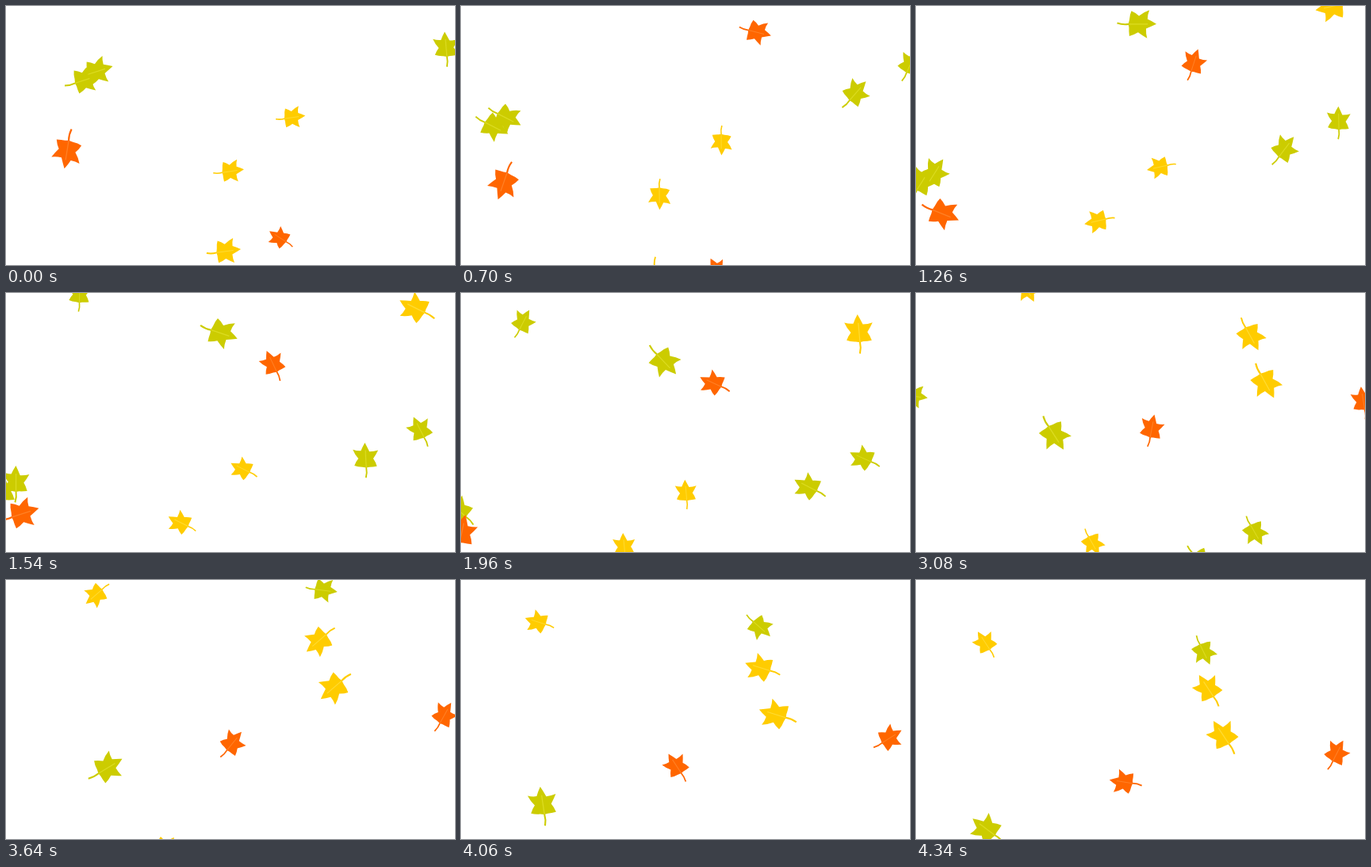
An HTML page with a canvas that plays this animation: 566 px wide and 327 px high, repeating every 4480 ms.

```html
<!DOCTYPE html>
<html lang="en">
<head>
<meta charset="utf-8">
<title>Falling leaves</title>
<style>
  html, body { margin: 0; width: 100%; height: 100%; overflow: hidden; background: #fff; }
  canvas { display: block; }
</style>
</head>
<body>
<canvas id="stage" width="566" height="327"></canvas>
<script>
const ctx = document.getElementById('stage').getContext('2d');
const STEP = 140, STEPS = 32;

// Steps at which the shared wind paths have a bend
const bends = [0, 5, 9, 14, 18, 26, 31];

const yellow = {
  fill: '#fc0', vein: '#ffdb33',
  x: [0, -32, -52, -76, -110, -164, -190],
  y: [0, 30, 62, 112, 154, 197, 259]
};
const green = {
  fill: '#cc0', vein: '#dcdc22',
  x: [0, -58, -91, -116, -150, -244, -281],
  y: [0, 58, 129, 192, 229, 344, 421]
};
const red = {
  fill: '#f60', vein: '#ff8126',
  x: [0, -23, -45, -76, -87, -110, -132],
  y: [0, 40, 80, 121, 147, 214, 262]
};

// turns: [step, stem angle in degrees] pairs
const spin = [[0, 175], [31, 779.5]];
const rock = [[0, 165], [5, 210], [9, 125], [14, 45]];

const leaf = (kind, x, y, size, turns, born = 0) => ({ kind, x, y, size, turns, born });
const leaves = [
  leaf(yellow, 360, 141, 18.5, spin),
  leaf(yellow, 282, 209, 19.3, spin),
  leaf(yellow, 276, 310, 21.5, spin),
  leaf(yellow, 578, -62, 24.5, spin),
  leaf(yellow, 559, -121, 23, spin, 15),
  leaf(yellow, 278, -179, 19, spin),
  leaf(green, 98, 94, 23, rock),
  leaf(green, 114, 83, 23, rock),
  leaf(green, 555, 53, 22, [[0, 88], [7.6, 158], [18, -50]]),
  leaf(green, 624, 17, 20.5, [[0, 150], [9, 92], [14, 27], [18, -45]]),
  leaf(green, 371, -106, 24.5, [[9, 183], [20, 285], [31, 40]]),
  leaf(green, 194, -154, 19.5, [[14, 120], [18, 155]]),
  leaf(green, 643, -331, 20, [[26, 190], [31, 247]]),
  leaf(red, 77, 182, 25, [[0, 282], [3.8, 318], [9, 205], [14, 105]]),
  leaf(red, 346, 293, 17.5, [[0, 36], [5, 63]]),
  leaf(red, 395, -7, 20.5, [[1, 285], [5, 197], [13.2, 20], [25.7, 139], [31, 12]], 1),
  leaf(red, 662, -42, 20.5, [[18, 46], [26, 122], [29.3, 153], [31, 120]])
];

// Smooth curve through the values at the bends
function along(values, t) {
  const last = bends.length - 1;
  let i = 0;
  while (i < last - 1 && t > bends[i + 1]) i++;
  const slope = k => {
    const a = Math.max(k - 1, 0), b = Math.min(k + 1, last);
    return (values[b] - values[a]) / (bends[b] - bends[a]);
  };
  const span = bends[i + 1] - bends[i], u = (t - bends[i]) / span, v = 1 - u;
  return values[i] * (1 + 2 * u) * v * v + values[i + 1] * u * u * (3 - 2 * u)
    + span * u * v * (slope(i) * v - slope(i + 1) * u);
}

// Straight pieces, extended past both ends
function angleAt(turns, t) {
  let i = 0;
  while (i < turns.length - 2 && t > turns[i + 1][0]) i++;
  const [t0, a0] = turns[i], [t1, a1] = turns[i + 1];
  return a0 + (a1 - a0) * (t - t0) / (t1 - t0);
}

// Unit leaf pointing along +x, with its stem along -x
const blade = new Path2D(`M-.5 .02 L-.46 -.2 Q-.46 -.46 -.38 -.66 Q-.16 -.58 .02 -.43
  Q.26 -.64 .54 -.75 Q.46 -.52 .47 -.29 Q.7 -.2 .94 -.06 Q.68 .08 .42 .2
  Q.42 .46 .5 .7 Q.24 .57 .02 .42 Q-.18 .56 -.42 .63 Q-.46 .4 -.46 .2 Z`);
const stem = new Path2D('M-.48 .02 Q-.78 .08 -1.08 0');
const vein = new Path2D('M-.48 .02 L.5 -.03');

function line(path, color, width) {
  ctx.strokeStyle = color;
  ctx.lineWidth = width;
  ctx.stroke(path);
}

function drawLeaf({ kind, x, y, size, turns }, t) {
  ctx.save();
  ctx.translate(x + along(kind.x, t), y + along(kind.y, t));
  ctx.rotate((angleAt(turns, t) + 180) * Math.PI / 180);
  ctx.scale(size, size);
  ctx.fillStyle = kind.fill;
  ctx.fill(blade);
  line(stem, kind.fill, .085);
  line(vein, kind.vein, .05);
  ctx.restore();
}

function render(now) {
  const t = Math.floor(now / STEP) % STEPS;
  ctx.fillStyle = '#fff';
  ctx.fillRect(0, 0, 566, 327);
  for (const item of leaves) if (t >= item.born) drawLeaf(item, t);
}

let start;
function tick(now) {
  start ??= now;
  render(now - start);
  requestAnimationFrame(tick);
}
render(0);
requestAnimationFrame(tick);
</script>
</body>
</html>
```
